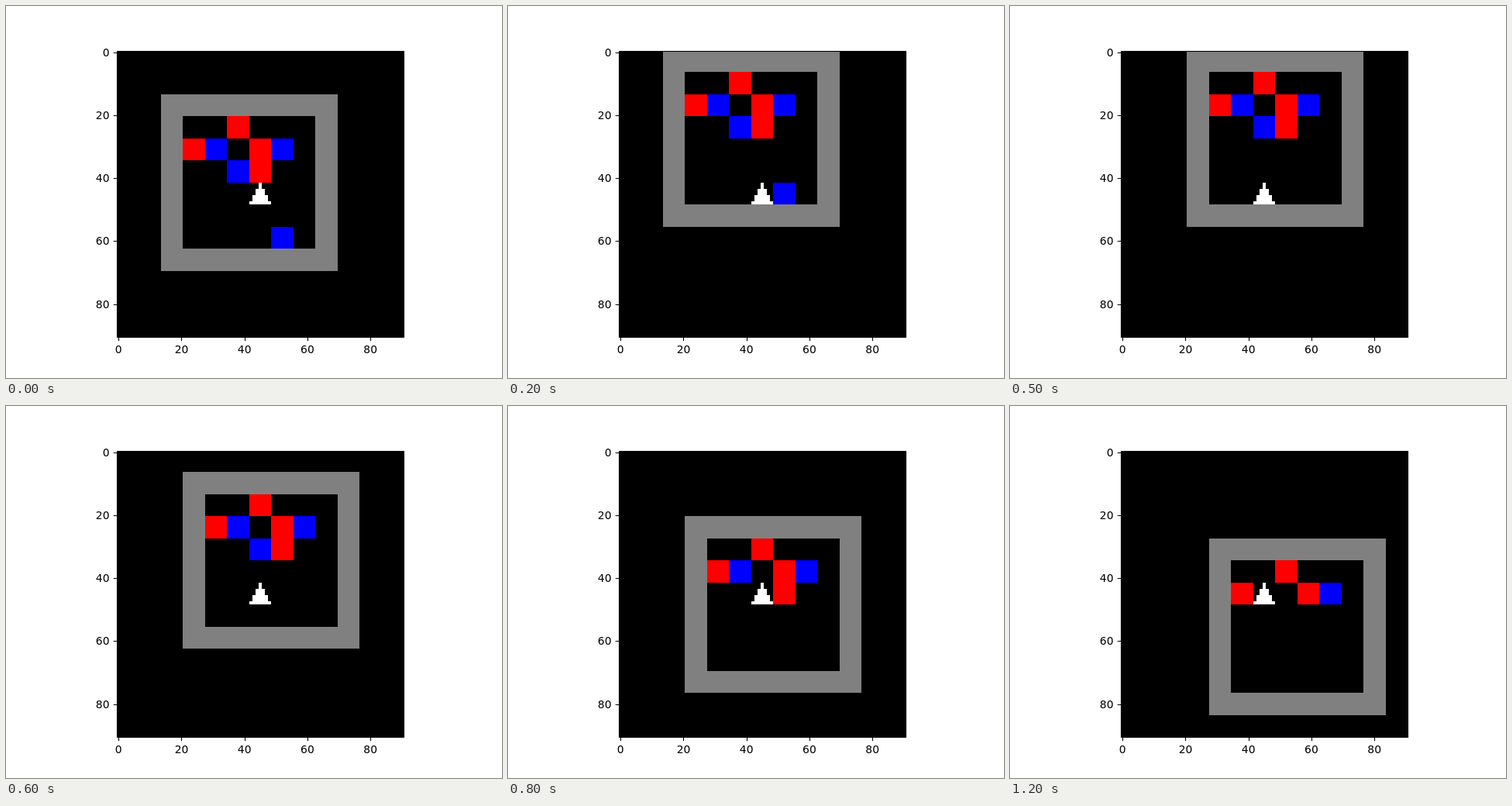
These frames come from a looping animation (640x480 px, 1.3 s). An HTML page:

```html
<!DOCTYPE html>
<html lang="en">
<head>
<meta charset="utf-8">
<title>Grid walk</title>
<style>
  html, body { margin: 0; width: 100%; height: 100%; overflow: hidden; background: #fff; }
  svg { display: block; }
  text { font: 13.889px "DejaVu Sans", sans-serif; }
  .axes { fill: none; stroke: #000; stroke-width: 1.11; }
</style>
</head>
<body>
<svg id="stage" width="640" height="480" viewBox="0 0 640 480">
  <defs><clipPath id="view"><rect x="143" y="58" width="371" height="370"/></clipPath></defs>
  <rect x="143" y="58" width="371" height="370"/>
  <g id="world" clip-path="url(#view)"></g>
  <g id="axes"></g>
</svg>
<script>
const NS = "http://www.w3.org/2000/svg";
const STEP = 100;
const CELL = 7;
const CENTER = 6; // the view keeps the walker in this cell

// Walker position in the room at each step
const path = [
  [4, 4], [4, 5], [4, 6], [5, 6], [4, 6], [3, 6], [3, 5],
  [3, 4], [3, 3], [4, 3], [3, 3], [2, 3], [2, 2]
];
const red = "#f00", blue = "#00f";
const items = [
  [3, 1, red], [1, 2, red], [4, 2, red], [4, 3, red],
  [2, 2, blue], [5, 2, blue], [3, 3, blue], [5, 6, blue]
];

function add(parent, tag, attrs, text) {
  const el = document.createElementNS(NS, tag);
  set(el, attrs);
  if (text !== undefined) el.textContent = text;
  return parent.appendChild(el);
}

function set(el, attrs) {
  for (const key in attrs) el.setAttribute(key, attrs[key]);
}

// Data units to whole pixels
const px = u => Math.round(143 + u * 370 / 91);
const py = u => Math.round(57 + u * 370 / 91);

function place(el, x, y, w, h) {
  set(el, { x: px(x), y: py(y), width: px(x + w) - px(x), height: py(y + h) - py(y) });
}

const world = document.getElementById("world");
const box = fill => add(world, "rect", { fill });
const wall = box("#808080");
const floor = box("#000");
const blocks = items.map(([x, y, color]) => ({
  x, y, el: box(color),
  takenAt: path.findIndex(p => p[0] === x && p[1] === y)
}));

// Stepped white triangle, two units per tier
for (let tier = 0; tier < 4; tier++) {
  const start = CENTER * CELL;
  place(box("#fff"), start + 3 - tier, start + 2 * tier, 1 + 2 * tier, tier < 3 ? 2 : 1);
}

const axes = document.getElementById("axes");
add(axes, "rect", { class: "axes", x: 143.5, y: 58.5, width: 370, height: 369 });
for (let value = 0; value <= 80; value += 20) {
  const offset = (value + 0.5) * 369.6 / 91;
  const x = 143.2 + offset, y = 57.6 + offset;
  const tickX = Math.round(x) + 0.5, tickY = Math.round(y) + 0.5;
  add(axes, "path", { class: "axes", d: `M${tickX} 427.5v4.86M143.5 ${tickY}h-4.86` });
  add(axes, "text", { x, y: 448, "text-anchor": "middle" }, value);
  add(axes, "text", { x: 133.5, y: Math.round(y + 5), "text-anchor": "end" }, value);
}

function draw(time) {
  const step = Math.floor(time / STEP) % path.length;
  const [col, row] = path[step];
  const left = (CENTER - col) * CELL, top = (CENTER - row) * CELL;
  place(wall, left, top, 8 * CELL, 8 * CELL);
  place(floor, left + CELL, top + CELL, 6 * CELL, 6 * CELL);
  for (const { x, y, el, takenAt } of blocks) {
    place(el, left + x * CELL, top + y * CELL, CELL, CELL);
    set(el, { visibility: takenAt >= 0 && step >= takenAt ? "hidden" : "visible" });
  }
}

const begin = performance.now();
function tick() {
  draw(performance.now() - begin);
  requestAnimationFrame(tick);
}
tick();
</script>
</body>
</html>
```
